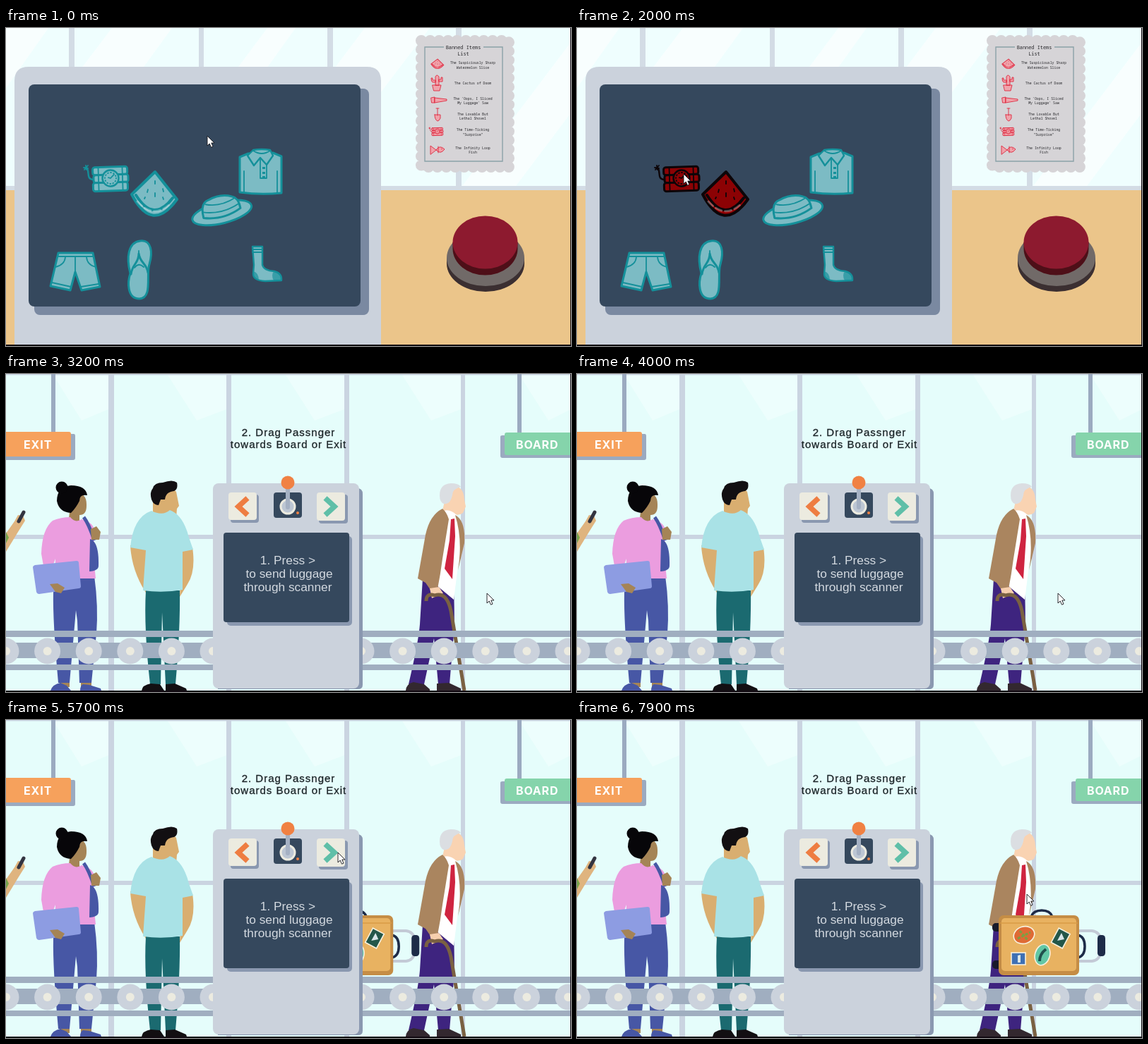
Write an HTML page that moves like this. It is 800 px wide and 451 px high and loops after 8 s.

```html
<!DOCTYPE html>
<html lang="en">
<head>
<meta charset="utf-8">
<title>Luggage scanner</title>
<style>
html, body { margin: 0; width: 100%; height: 100%; overflow: hidden; background: #120a12 }
svg { display: block; width: 800px; height: 451px }
.item { fill: var(--fill); stroke: var(--line); stroke-width: 3; stroke-linejoin: round; stroke-linecap: round }
.item .thin { stroke-width: 1.8; fill: none }
.item .dots { fill: var(--line); stroke: none }
.safe { --fill: #7cbbc4; --line: #14909a }
.banned { --fill: #8c0204; --line: #0c0508 }
.icon { --fill: #f0a3ab; --line: #de2a40 }
.note { font: 4.85px "Noto Sans Mono", "DejaVu Sans Mono", monospace; fill: #26262a; text-anchor: middle }
.sans { font-family: "Liberation Sans", Arial, sans-serif; text-anchor: middle }
.sign { font: bold 16px Inter, sans-serif; fill: #fff }
.steel { fill: #a0aec0 }
.body { fill: #cbd2dc }
.shade { fill: #8a98b0 }
.dark { fill: #35485d }
.cream { fill: #ecebe0 }
</style>
</head>
<body>
<svg viewBox="0 0 800 451">
<defs>
  <g id="melon" class="item">
    <path d="M211 204L178 236Q207 292 242 243Z" stroke-width="4"/>
    <path d="M184 237Q209 277 236 241" fill="none" stroke-width="4"/>
    <path d="M186 246Q209 272 233 249" fill="none" stroke="#fff" stroke-opacity=".3" stroke-dasharray="9 5"/>
    <path class="thin" d="M211 217v4M201 229l-1 4M211 234v5M222 228l1 4M197 240l-1 2M222 240l1 3"/>
  </g>
  <g id="bomb" class="item">
    <g transform="rotate(-2 148 213)">
      <rect x="123" y="197" width="49" height="11" rx="3"/>
      <rect x="124" y="208" width="49" height="11" rx="3"/>
      <rect x="123" y="219" width="49" height="12" rx="3"/>
      <path class="thin" d="M131 198v32M165 198v32"/>
      <circle cx="148" cy="213" r="11.5" stroke-width="2.4"/>
      <circle class="thin" cx="148" cy="213" r="8" stroke-dasharray="1 3.2"/>
      <path class="thin" d="M148 213l5-5M148 213l-3-1"/>
    </g>
    <path d="M123 215C113 214 119 203 114 198" fill="none" stroke-width="2.4"/>
    <path class="thin" d="M110 198l6 1M113 195l1 6M111 201l5-6"/>
  </g>
</defs>

<g id="scan">
  <path fill="#effefe" d="M0 0H800V230H0Z"/>
  <path fill="#fff" opacity=".6" d="M0 0H60L0 85ZM97 70L150 0H235L97 190ZM281 120L370 0H410L281 180ZM463 60L508 0H600L463 180ZM646 224L800 20V120L722 224Z"/>
  <path fill="#d3dce5" d="M89 0h8v224h-8zM273 0h7v224h-7zM455 0h8v224h-8zM637 0h8v224h-8zM0 224H800v6H0z"/>
  <path fill="#ebc58a" d="M0 230H800V449H0Z"/>
  <path class="body" d="M12 449V75Q12 55 32 55H511Q531 55 531 75V449Z"/>
  <rect x="40" y="86" width="474" height="321" rx="8" fill="#7a89a1"/>
  <rect class="dark" x="32" y="80" width="470" height="315" rx="8"/>

  <g class="safe">
    <g class="item">
      <path d="M343 178L331 183V233Q360 237 390 234V182L378 177Z"/>
      <path d="M350 173Q362 171 374 173L378 181 369 194 360 184 351 195 342 181Z" stroke-width="2.4"/>
      <path class="thin" d="M350 174Q362 182 374 174M360 185V213H369V193M337 203V233M384 203V233"/>
      <path class="dots" d="M363 197h4v3h-4zM363 204h4v3h-4zM363 210h4v2h-4z"/>
    </g>
    <g class="item" transform="translate(305 259) rotate(-14)">
      <ellipse cy="3" rx="43" ry="15"/>
      <path d="M-27 4Q-27-18-14-19Q4-24 19-16Q28-12 27 3Q0 14-27 4Z"/>
      <path class="thin" d="M-20-14Q0-5 23-13M-26-4Q0 6 27-4"/>
    </g>
    <g class="item">
      <path d="M74 319H123L133 367 107 372 98 346 91 372 63 366Z"/>
      <path class="thin" d="M73 324H124M84 325Q83 336 70 339M114 325Q115 336 127 339M98 325V346M65 361L92 367M106 367L131 363"/>
    </g>
    <g class="item">
      <path d="M190 302C206 300 208 318 203 335C198 350 208 383 189 384C171 384 172 360 176 348C170 325 173 304 190 302Z"/>
      <path d="M188 320C188 334 179 334 177 349M188 320C190 334 199 333 201 347" fill="none"/>
      <path class="thin" d="M188 320v-4M182 340Q188 332 195 339"/>
    </g>
    <g class="item">
      <path d="M349 310H363V336Q365 344 380 345 391 348 390 358L367 359Q350 358 350 349L351 336Z" stroke-width="2.4"/>
      <path class="thin" d="M349 314H363M349 318H363"/>
      <path class="dots" opacity=".65" d="M350 345Q358 347 358 358 350 356 350 345ZM379 345Q375 351 379 358H390Q391 348 379 345Z"/>
    </g>
  </g>
  <use id="melonItem" href="#melon"/>
  <use id="bombItem" href="#bomb"/>

  <rect x="588" y="18" width="124" height="179" fill="#d6d4d7" stroke="#d6d4d7" stroke-width="16" stroke-linecap="round" stroke-dasharray="0 12.63"/>
  <path d="M620 27H593V189H703V27H676" fill="none" stroke="#8ba2a8" stroke-width="1.4"/>
  <g class="note" id="list"></g>
  <g class="icon">
    <use href="#melon" transform="translate(552 -.9) scale(.28 .22)"/>
    <use href="#bomb" transform="translate(563.5 78.5) scale(.32)"/>
    <g class="item" style="stroke-width:.9">
      <path d="M604 81H616L614 89H606ZM608 81V69Q610 65 613 69V81ZM608 77H604Q602 76 602 71H604V74H608ZM613 76H618V70H616V73H613Z"/>
      <path d="M602 99L607 98V106H603ZM607 99L624 101V103L607 106Z"/>
      <path d="M609 114H613M611 114V124M607 123H615V128Q613 132 611 132 607 130 607 123Z"/>
      <path d="M609 173Q614 165 621 172 615 180 609 173L601 167V179ZM612 168V177M617 171v1"/>
    </g>
  </g>

  <path fill="#3b2f31" d="M624 326H734V334A55 40 0 0 1 624 334Z"/>
  <ellipse cx="679" cy="326" rx="55" ry="40" fill="#716a68"/>
  <path fill="#4e0f18" d="M632.5 304H724.5V313A46 37.5 0 0 1 632.5 313Z"/>
  <ellipse cx="678.5" cy="304" rx="46" ry="37.5" fill="#8d1a2f"/>
</g>

<g id="hall">
  <path fill="#e5fdfb" d="M0 0H800V449H0Z"/>
  <path fill="#fff" opacity=".3" d="M66 0H145V50L107 66ZM228 0H312V50L270 66ZM395 0H479V50L437 66ZM560 0H644V50L602 66ZM726 0H800V50L768 66Z"/>
  <path fill="#cad4e1" d="M145 0h8v449h-8zM312 0h7v449h-7zM479 0h7v449h-7zM644 0h6v449h-6zM0 228H800v6H0zM0 0H800v1.5H0z"/>

  <path fill="#9baac0" d="M64 0h6v90h-6zM724 0h6v90h-6zM0 85H96Q98 85 98 88V119Q98 122 95 122H0ZM700 89Q700 87 703 87H800V119H703Q700 119 700 116Z"/>
  <path fill="#f6a15c" d="M0 82H89Q92 82 92 85V114Q92 117 89 117H0Z"/>
  <path fill="#85d4ab" d="M706 86Q706 83 709 83H800V115H709Q706 115 706 112Z"/>
  <text class="sign" x="25" y="105.5" letter-spacing=".9">EXIT</text>
  <text class="sign" x="722" y="105.5" letter-spacing=".8">BOARD</text>

  <path fill="#dfb47f" d="M0 226L12 209 17 200 24 201 27 208 17 224 0 252Z"/>
  <path fill="#79a54c" d="M0 224L4 232 0 240Z"/>
  <path d="M18 209L25 196" stroke="#333440" stroke-width="5" stroke-linecap="round"/>

  <g>
    <path fill="#a58456" d="M76 432H90V444H76ZM106 432H121V444H106ZM93 168Q115 166 114 187 114 200 104 200V209Q96 215 89 205Z"/>
    <path fill="#4757a5" d="M70 288L125 286Q131 330 128 368L121 438H104L101 350 99 335 90 438H74Q66 350 67 310ZM63 449Q66 440 77 438L86 442 92 449ZM105 449Q105 442 109 440L118 441 134 446 135 449Z"/>
    <path fill="#070609" d="M72 180Q72 160 92 158 113 158 115 172 104 170 104 180 99 190 92 197 75 196 72 180Z"/>
    <circle cx="79" cy="161" r="8.5" fill="#070609"/>
    <path fill="#eb9ddf" d="M66 208Q78 203 91 203 98 212 107 206 124 210 126 224L123 250 127 290H69L70 262 65 275 53 272 50 255Q51 220 66 208Z"/>
    <path fill="#4757a5" d="M119 234Q132 238 131 272 131 279 118 280Z"/>
    <path d="M110 203Q117 212 125 236" fill="none" stroke="#4757a5" stroke-width="5"/>
    <path fill="#a58456" d="M120 220L128 216 134 224 132 235 121 235Z"/>
    <path fill="#8d9ce2" d="M38 274Q38 272 41 271L100 265Q103 265 103 268L106 301Q106 304 103 304L47 312Q44 312 43 309Z"/>
    <path fill="#a58456" d="M62 298L73 297 83 303 78 311 70 309Z"/>
  </g>

  <g>
    <path fill="#d9ae70" d="M216 168Q236 160 241 167L245 187 242 191 241 204Q233 209 228 204V216H208V180ZM176 243L200 247 199 277 211 300 202 316Q178 282 176 243ZM249 248L264 246Q269 280 257 298L246 316Z"/>
    <path fill="#1b6a70" d="M198 307H246Q247 360 240 440H226L221 338 219 440H204Q195 360 198 307Z"/>
    <path fill="#120f12" d="M206 178Q203 168 208 162 210 154 222 154 236 149 242 154 244 163 238 166 226 167 225 178L219 178 216 186Q209 186 206 178ZM192 449Q193 441 205 439L218 440 224 449ZM226 449V440L239 439 255 446 256 449Z"/>
    <path fill="#a9e2e6" d="M206 194Q222 202 232 193 251 200 259 232L265 249 250 252V306Q222 311 194 307L198 250 176 246Q180 203 206 194Z"/>
  </g>

  <g>
    <path fill="#3e247f" d="M590 290L634 305Q636 360 633 380L628 440H612L606 375 592 440H570Q584 380 586 355Z"/>
    <path fill="#f9d3b2" d="M626 158Q648 156 649 178L651 188 647 197Q640 202 633 198L626 199 618 194Z"/>
    <path fill="#dbdee2" d="M614 172Q614 156 630 155 641 155 644 160 632 163 632 172 629 186 620 184 614 182 614 172Z"/>
    <path fill="#fff" d="M617 195Q628 190 638 200L647 240 640 272 634 320 610 300Z"/>
    <path fill="#cf2440" d="M630 206L635 205 636 230 632 291 621 276 628 236Z"/>
    <path fill="#aa855f" d="M618 191Q600 200 594 228L583 290 594 296 603 309 611 305Q615 285 618 262L627 206Q624 196 618 191ZM636 200Q651 208 649 240L640 278Q647 235 636 200Z"/>
    <path fill="#f6cfae" d="M600 304L613 302 619 311 603 318Z"/>
    <path d="M595 322Q595 310 607 314 624 308 630 336L649 449" fill="none" stroke="#7a6142" stroke-width="5"/>
    <path fill="#33282f" d="M566 449Q567 439 577 437L592 440 600 447V449ZM610 449V439L627 438 644 446V449Z"/>
  </g>

  <g id="case">
    <g fill="none" stroke="#1d2b48" stroke-width="3.5">
      <path d="M643 279Q646 270 658 270 670 270 673 279"/>
      <path d="M709 305Q719 307 719 321 719 335 709 337"/>
      <path d="M709 299H729Q740 300 742 313M709 342H729Q740 341 742 328" stroke="#c3cad6" stroke-width="4"/>
    </g>
    <rect x="737" y="305" width="11" height="30" rx="4.5" fill="#1d2b48"/>
    <rect x="588" y="288" width="14" height="12" rx="5" fill="#171a2b"/>
    <rect x="588" y="341" width="14" height="12" rx="5" fill="#171a2b"/>
    <rect x="597" y="277" width="114" height="85" rx="7" fill="#c58d45"/>
    <rect x="601" y="281" width="106" height="75" rx="5" fill="#e8b261"/>
    <path d="M599 288H709" stroke="#d99b46" stroke-width="1.5"/>
    <g stroke="#f7f1df" stroke-width="1.6">
      <ellipse cx="633" cy="305" rx="15" ry="12" transform="rotate(-18 633 305)" fill="#df6b35"/>
      <rect x="676" y="298" width="18" height="23" transform="rotate(28 685 309)" fill="#245749"/>
      <rect x="615" y="330" width="20" height="17" fill="#3f70b4"/>
      <ellipse cx="659" cy="333" rx="10.5" ry="15" transform="rotate(15 659 333)" fill="#62c7a5"/>
    </g>
    <path d="M624 310L642 301M627 299L638 312" stroke="#79a144" stroke-width="3" stroke-dasharray="4 2"/>
    <path fill="#d9e6e8" d="M680 313L686 302 690 311ZM624 334L628 333V344H624Z"/>
    <path d="M655 342Q655 332 664 325" fill="none" stroke="#20504c" stroke-width="4"/>
  </g>

  <path class="steel" d="M0 364H800v9H0zM0 381H800v22H0zM0 412H800v8H0z"/>
  <g id="rollers"></g>

  <path class="shade" d="M300 170Q300 162 308 162H497Q505 162 505 170V441Q505 447 498 447H300Z"/>
  <rect class="body" x="293" y="155" width="207" height="291" rx="8"/>
  <g class="shade">
    <rect x="318" y="171" width="40" height="40" rx="4"/>
    <rect x="443" y="171" width="41" height="41" rx="4"/>
    <rect x="313" y="230" width="177" height="127" rx="5"/>
  </g>
  <rect class="cream" x="315" y="168" width="40" height="39" rx="4"/>
  <rect class="cream" x="440" y="168" width="40" height="40" rx="4"/>
  <g fill="none" stroke-width="7.5">
    <path d="M342 176L329 188 342 200" stroke="#ee7d42"/>
    <path d="M452 176L465 188 452 200" stroke="#5fbfa8"/>
  </g>
  <rect class="dark" x="379" y="168" width="40" height="36" rx="4"/>
  <circle cx="399" cy="188" r="10" fill="#bcc6d3" stroke="#ecebe0" stroke-width="3"/>
  <path d="M399 158V189" stroke="#a5b1c3" stroke-width="6" stroke-linecap="round"/>
  <circle cx="399" cy="154" r="9.5" fill="#f08143"/>
  <circle cx="413" cy="197" r="2" fill="#f08143"/>
  <rect class="dark" x="308" y="225" width="178" height="127" rx="4"/>
  <g class="sans" font-size="17.3" fill="#d3d9e0">
    <text x="399" y="270">1. Press &gt;</text>
    <text x="401" y="289">to send luggage</text>
    <text x="399" y="308">through scanner</text>
  </g>
  <g class="sans" font-size="15" letter-spacing="1" fill="#1c2428" stroke="#1c2428" stroke-width=".3">
    <text x="400" y="88">2. Drag Passnger</text>
    <text x="400" y="105">towards Board or Exit</text>
  </g>
</g>

<path fill="#120a12" d="M0 449H800V451H0ZM799 0h1V449h-1z"/>
<path id="cursor" d="M0 0V14L3.2 11 5.5 16.2 8 15.1 5.8 10H10Z" fill="#fff" stroke="#15151a" stroke-width=".9"/>
</svg>
<script>
const $ = id => document.getElementById(id);
const LOOP = 8000, STEP = 100, CUT = 3200;

const notes = [
  ["The Suspiciously Sharp", 51], ["Watermelon Slice", 57.5], ["The Cactus of Doom", 80],
  ["The 'Oops, I Sliced", 102], ["My Luggage' Saw", 108], ["The Lovable But", 123.5],
  ["Lethal Shovel", 130], ["The Time-Ticking", 146], ["“Surprise”", 152.5],
  ["The Infinity Loop", 172], ["Fish", 178]
];
$("list").innerHTML =
  '<g font-size="6.9"><text x="647.5" y="30">Banned Items</text><text x="647.5" y="39">List</text></g>' +
  notes.map(([text, y]) => `<text x="661" y="${y}">${text}</text>`).join("");

const roller = x => `<circle class="body" cx="${x}" cy="393" r="18.5"/><circle class="cream" cx="${x}" cy="393" r="6"/>`;
for (let i = 0; i < 6; i++) $("rollers").innerHTML += roller(58.6 * i) + roller(503 + 58.6 * i);

// Cursor moves: start, end, x, y
const home = [285, 153];
const moves = [
  [0, 600, 212, 232], [1000, 1700, 151, 207], [2000, 2900, 681, 311],
  [4500, 5200, 470, 188], [7700, 7900, 637, 247]
];
const clamp = v => Math.max(0, Math.min(1, v));
const ease = v => v * v * (3 - 2 * v);

function cursorAt(t) {
  let [x, y] = home;
  for (const [start, end, toX, toY] of moves) {
    const k = ease(clamp((t - start) / (end - start)));
    x += (toX - x) * k;
    y += (toY - y) * k;
  }
  return `translate(${x} ${y})`;
}

function draw() {
  const t = Math.floor(performance.now() % LOOP / STEP) * STEP;
  $("scan").style.display = t < CUT ? "" : "none";
  $("hall").style.display = t < CUT ? "none" : "";
  $("melonItem").setAttribute("class", t < 1000 ? "safe" : "banned");
  $("bombItem").setAttribute("class", t < 2000 ? "safe" : "banned");
  const slide = Math.max(-270, Math.min(0, (t - 6425) * .2245));
  $("case").setAttribute("transform", `translate(${slide})`);
  $("cursor").setAttribute("transform", cursorAt(t));
  requestAnimationFrame(draw);
}
draw();
</script>
</body>
</html>
```
